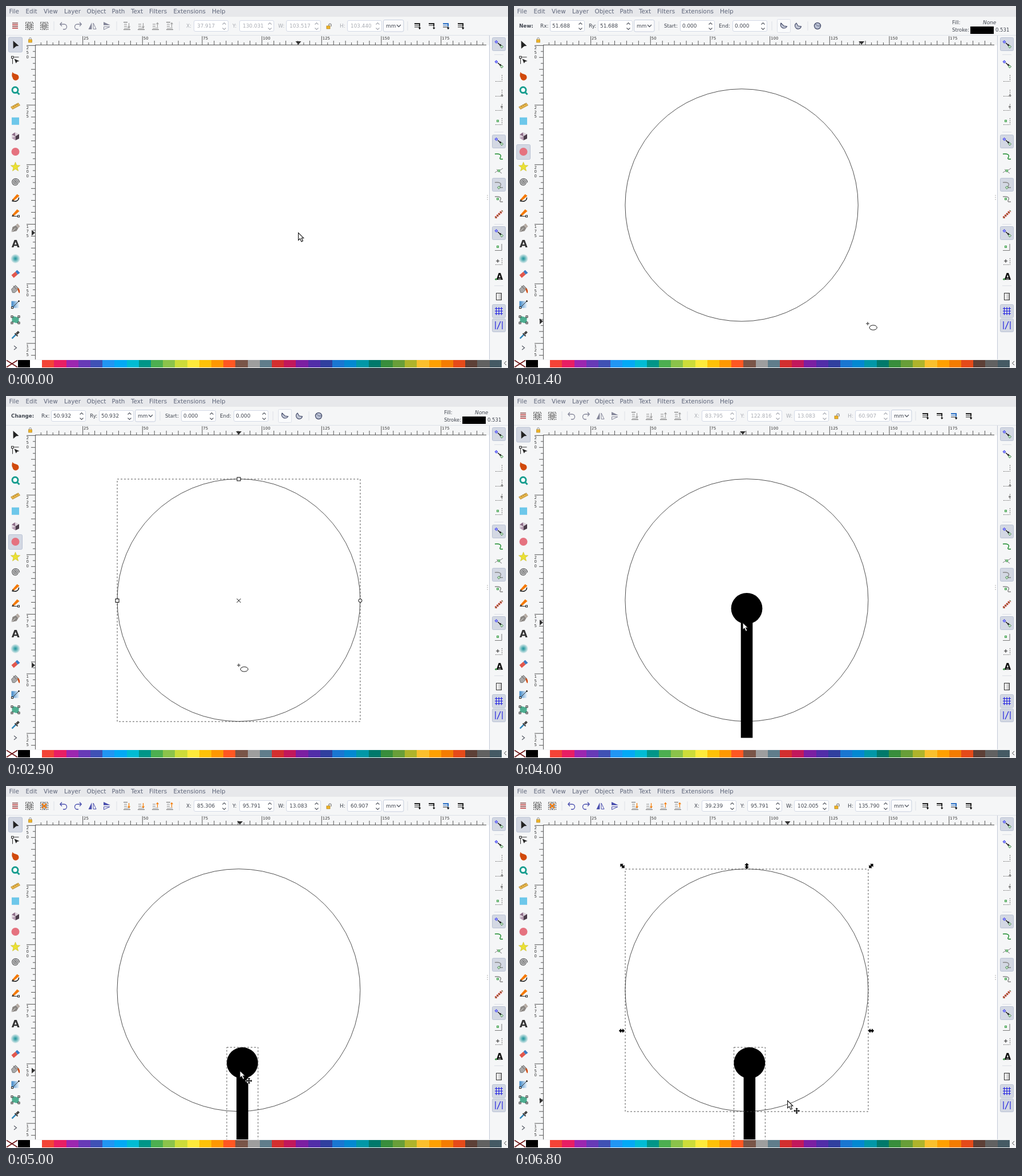
Write an HTML page that moves like this. It is 880x636 px and loops after 8000 ms.

```html
<!DOCTYPE html>
<html lang="en">
<head>
<meta charset="utf-8">
<title>Drawing a circle and a pin</title>
<style>
html, body { margin: 0; width: 100%; height: 100%; overflow: hidden; background: #f5f6f7; }
svg { display: block; width: 880px; height: 636px; }
text { font: 8.9px "DejaVu Sans", sans-serif; fill: #3f444e; white-space: pre; }
.menu text { font-size: 10.4px; fill: #5f667a; }
.ruler text { font-size: 7px; fill: #333; }
.dim { --ink: #85879a; --hot: #a0a0a0; --num: #a9acb3; --spin: #a5a8b0; }
.live { --ink: #4a4fae; --hot: #f57900; --num: #3f444e; --spin: #50545e; }
.num { fill: var(--num); }
.ink { stroke: var(--ink); fill: none; }
.solid { fill: var(--ink); }
.spin { fill: none; stroke: var(--spin); stroke-width: 1.1; }
.dash { fill: none; stroke: #444; stroke-width: .9; stroke-dasharray: 3 3; }
</style>
</head>
<body>
<svg id="stage" viewBox="0 0 880 636" xmlns="http://www.w3.org/2000/svg"></svg>
<script>
const LOOP = 8000, STEP = 100, PX = 4.187;
const LEFT = 194.9, TOP = 145.7;
const $ = id => document.getElementById(id);
const at = (x, y, body, extra = '') => `<g transform="translate(${x} ${y})${extra}">${body}</g>`;
const rect = (x, y, w, h, fill, more = '') => `<rect x="${x}" y="${y}" width="${w}" height="${h}" fill="${fill}" ${more}/>`;
const line = (d, color = '#333', w = 1, more = '') => `<path d="${d}" fill="none" stroke="${color}" stroke-width="${w}" ${more}/>`;
const shape = (d, fill, more = '') => `<path d="${d}" fill="${fill}" ${more}/>`;
const dot = (x, y, r, fill, more = '') => `<circle cx="${x}" cy="${y}" r="${r}" fill="${fill}" ${more}/>`;
const text = (x, y, s, more = '') => `<text x="${x}" y="${y}" ${more}>${s}</text>`;
const pressed = (x, y, w, h) => rect(x, y, w, h, '#d3d8e3', 'rx="2" stroke="#b9c2d4"');
const vsep = x => line(`M${x} 27V43`, '#dde0e6');

function field(x, id, pad = 6, value = '') {
  return rect(x + .5, 25.5, 60, 19, '#fff', 'rx="2.5" stroke="#d3d9e6"') +
    text(x + pad, 38.3, value, `id="${id}" class="num"`) +
    `<path class="spin" d="M${x + 50.5} 32.5l3 -3 3 3M${x + 50.5} 38.5l3 3 3 -3"/>`;
}
const unit = x => rect(x + .5, 24.5, 35.5, 20.5, '#fbfbfc', 'rx="2.5" stroke="#c6cede"') +
  text(x + 5, 38.3, 'mm') + line(`M${x + 24} 33l3.5 3.5 3.5 -3.5`, '#555a64', 1.3);

function menu() {
  const items = { File: 5.5, Edit: 34.5, View: 66, Layer: 102, Object: 141.5, Path: 185.5, Text: 219, Filters: 251, Extensions: 293.5, Help: 361 };
  return rect(0, 0, 880, 19, '#e7e8eb') + '<g class="menu">' +
    Object.entries(items).map(([s, x]) => text(x, 13.3, s)).join('') + '</g>';
}

function selectBar() {
  const stack = hot => rect(-6.5, -6.5, 13, 13, 'none', 'stroke="#333" stroke-dasharray="2 1.5"') +
    [3, 0, -3].map(y => shape(`M-5 ${y}l5 -2.2 5 2.2 -5 2.2z`, '#e8e8e8', 'stroke="#333" stroke-width=".8"')).join('') +
    (hot ? '<path style="stroke:var(--hot)" stroke-width="2" d="M-4 -4L4 4M-4 4L4 -4"/>' : '');
  const undo = '<path class="ink" stroke-width="1.3" d="M-6 -3H1a4.5 4.5 0 0 1 0 9H-1M-3 -6.5L-6.2 -3L-3 .5"/>';
  const flip = '<path class="solid" d="M-1.2 -6V6H-7z"/><path class="ink" d="M1.5 -5V5.5H6.5z"/>';
  const order = (up, end) => [-5, -1.5, 2].map(y => line(`M-5 ${y + 2}H${y > 0 ? 5 : 0}`, '#8a8a8a')).join('') +
    line(`M-6 6.5H6${end ? 'M-6 -6.5H1' : ''}`, '#666') +
    `<path fill="none" style="stroke:var(--hot)" stroke-width="1.2" d="M3.5 -5V2.5${up ? 'M1.5 -3L3.5 -5.5L5.5 -3' : 'M1.5 .5L3.5 3L5.5 .5'}"/>`;
  const affect = i => [-4, -1, 2].slice(0, i === 1 ? 2 : 3).map(y => line(`M-5 ${y}H4V${y + 4}`, i === 2 && y < 0 ? '#2a6fc4' : '#222', y < -3 ? 2 : 1.2)).join('') +
    shape('M2 3H6.5L4 6z', '#111');
  return at(16, 35, [-5, -2, 1, 4].map((y, i) => line(`M-5 ${y}H5`, i % 2 ? '#b33' : '#8a4a4a', 1.5)).join('')) +
    at(41, 35, stack(false)) + at(67, 35, stack(true)) + vsep(84) +
    at(101, 35, undo) + at(126, 35, undo, ' scale(-1 1)') + at(151.5, 35, flip) + at(177, 35, flip, ' rotate(90)') + vsep(194) +
    [212, 237, 262, 287].map((x, i) => at(x, 35, order(i > 1, i % 3 === 0))).join('') + vsep(304) +
    [['X:', 316, 329], ['Y:', 397, 409], ['W:', 477, 491], ['H:', 585, 598]].map(([s, x, f], i) => text(x, 38.3, s, 'class="num"') + field(f, 'val' + i)).join('') +
    at(566, 36, rect(-4, -1, 6, 5, '#f0b429', 'stroke="#a8780a" stroke-width=".7"') + line('M0 -1V-3a2 2 0 0 1 4 0V0', '#777', 1.2)) +
    unit(661) + vsep(704) + [721, 746, 771, 797].map((x, i) => at(x, 35, affect(i))).join('');
}

function ellipseBar() {
  const pie = (d, x) => at(x, 35, shape(d, '#c3c8d6', 'stroke="#434a68" stroke-width="1.1"'));
  return text(9, 38.3, '', 'id="mode" style="font-weight:bold;font-size:8.7px"') + '<g id="ellipseFields" class="live">' +
    text(46, 38.3, 'Rx:') + field(63, 'rx', 4) + text(131, 38.3, 'Ry:') + field(147, 'ry', 4) + unit(210) + vsep(254) +
    text(263, 38.3, 'Start:', 'style="font-size:8.6px"') + field(291, 'start', 4, '0.000') + text(359, 38.3, 'End:') + field(383, 'end', 4, '0.000') + vsep(452) +
    rect(461.5, 23.5, 23, 23, '#fafbfc', 'stroke="#dce0e8" rx="2"') +
    pie('M-5 -5L0 0L5.5 1A5.6 5.6 0 1 1 -5 -5z', 473) + pie('M-3 -5L0 0L5.5 1A5.6 5.6 0 1 1 -3 -5z', 498) + vsep(515) +
    at(532, 35, dot(0, 0, 5.6, '#b8bfd2', 'stroke="#434a68" stroke-width="1.2"') + line('M0 0H5.5M0 0L-4 -4', '#434a68', .8)) + '</g>' +
    text(768, 32, 'Fill:', 'style="font-size:8.6px"') + text(822, 32, 'None', 'style="font-style:italic"') +
    text(768, 45, 'Stroke:', 'style="font-size:8.5px"') + rect(800, 36, 41, 13, '#000') + text(844, 45, '0.531', 'style="font-size:8.5px"');
}

function rulers() {
  let d = 'M51 68.5H842M51.5 69V621', labels = '';
  for (let i = -8; i < 68; i++) {
    const p = i * 2.5 * PX, x = 134.6 + p, y = 69.4 + p;
    const n = i % 10 === 0 ? 15 : i % 2 ? 4 : 7;
    if (x > 52 && x < 842) d += `M${x} 68v${-n}`;
    if (y > 69 && y < 621) d += `M51 ${y}h${-n}`;
    if (n < 15) continue;
    if (x < 842) labels += text(x + 1.4, 59, 25 + i * 2.5);
    if (y < 621) [...String(250 - i * 2.5)].forEach((c, k) => labels += text(35.5, y + 7 + k * 7.6, c));
  }
  return line(d, '#444', .9) + `<g class="ruler">${labels}</g>` +
    at(42.5, 60, rect(-3, -1, 6, 5, '#f0b429', 'stroke="#a8780a" stroke-width=".6"') + line('M-1.8 -1V-2.5a1.8 1.8 0 0 1 3.6 0V-1', '#888', 1));
}

function toolbox() {
  const arrow = shape('M-4 -7L6 2L1.5 2.5L-3.8 7z', '#222');
  const corners = (w, h) => [[-w, -h], [w, -h], [w, h], [-w, h]].map(([x, y]) => rect(x - 1.5, y - 1.5, 3, 3, '#fff', 'stroke="#222"')).join('');
  const pencil = shape('M-5 3L3 -6L7 -3L-2 5L-6 6z', '#f57900') + shape('M-5 3L-2 5L-6 6z', '#333');
  const spiral = () => {
    let d = 'M0 0';
    for (let a = 0; a < 19; a += .3) d += `L${(a * .37 * Math.cos(a)).toFixed(1)} ${(a * .37 * Math.sin(a)).toFixed(1)}`;
    return line(d, '#444', 1.1);
  };
  const star = Array.from({ length: 10 }, (_, i) => {
    const r = i % 2 ? 3.6 : 8.5, a = i * Math.PI / 5;
    return `${(r * Math.sin(a)).toFixed(1)},${(-r * Math.cos(a)).toFixed(1)}`;
  }).join(' ');
  const art = [
    arrow,
    line('M-5 -5H6M-5 -5V7', '#333') + rect(-7, -6.5, 3.5, 3.5, '#fff', 'stroke="#222"') + shape('M-2 -2L7 2L3 3L1 6z', '#222'),
    shape('M-5 -6C-4 -1 5 -4 6 3A5.5 5.5 0 0 1 -5 4C-7 1 -6 -3 -5 -6z', '#d1490b'),
    dot(-.5, -1, 5, '#fff', 'stroke="#179d8f" stroke-width="3"') + line('M3 3L7 7', '#179d8f', 3),
    shape('M-8 2L5 -5L8 -1L-5 6z', '#e8b64c', 'stroke="#a77c20" stroke-width=".7"') + line('M-4 0l1.5 2M-1 -2l1.5 2M2 -3.5l1.5 2', '#7a5a14', .8),
    rect(-6.5, -6.5, 13, 13, '#6dc7ea'),
    shape('M0 -7L6.5 -4V4L0 7L-6.5 3V-3z', '#ddd3dc') + shape('M0 0L6.5 -4V4L0 7z', '#4b3c4a') + shape('M-6.5 -3L0 0L-1 -7z', '#8d6c87') + shape('M-6.5 3L0 0V7z', '#b79db3'),
    dot(0, 0, 7, '#e5727f'),
    `<polygon points="${star}" fill="#eae033" stroke="#cbbf20" stroke-width=".7"/>`,
    spiral(),
    pencil + line('M-6 6C0 8 6 6 6 0', '#222', 1.5),
    pencil + line('M-6 6H4', '#222') + rect(4, 4.5, 3, 3, '#fff', 'stroke="#222"'),
    shape('M-7 7L-5 -2L1 -5L5 0L2 5z', '#8b8783') + shape('M1 -6L4 -8L8 -3L5 0z', '#b5aaa2') + line('M-7 7L0 0', '#fff', .8),
    text(-6.7, 6.5, 'A', 'style="font-size:18px;font-weight:bold;fill:#333"'),
    dot(0, 0, 8, 'url(#glow)'),
    shape('M-7 2L0 -4L4 1L-3 7z', '#e2574c') + shape('M0 -4L3 -7L8 -2L4 1z', '#3b7dc4'),
    shape('M-7 0L0 -7L6 -1L-1 6H-5z', '#a9a9a9', 'stroke="#777"') + line('M-4 -6L2 0', '#666') + shape('M3 -2C8 -1 8 3 7.5 7C5 7 5 2 3 -2z', '#cf4a12'),
    rect(-7, -6, 13, 12, 'url(#sky)') + line('M-5 5L6 -6', '#333') + rect(-7, 4, 3, 3, '#fff', 'stroke="#222"') + dot(6, -6, 1.5, '#333'),
    shape('M-6 -5C-2 -8 2 -3 6 -5V5C2 8 -2 3 -6 5z', '#4fae91') + corners(6, 5.5),
    line('M-6 6L1 -1', '#2b82b5', 2.5) + line('M-1 -3L4 2', '#333', 2) + line('M2 -2L6 -6', '#444', 4)
  ];
  return art.map((a, i) => at(16.5, 68 + i * 26.85, a)).join('') + line('M14 597l4.5 3.5 -4.5 3.5', '#555a64', 1.2);
}

function snapBar() {
  const green = '#3f9b4b', blue = '#2020e0';
  const node = (x, y, c = '#c5ecc8', s = '#23602a') => shape(`M${x - 2.6} ${y}l2.6 -2.6 2.6 2.6 -2.6 2.6z`, c, `stroke="${s}" stroke-width=".8"`);
  const snap = node(-4.5, -4, '#8c90ff', blue) + line('M-2 -2L3 2', '#111', 1.4) + shape('M4 3L.5 2.6L3.4 -.4z', '#111') + node(5, 4.5);
  const corner = line('M5.5 -6V5.5H-7', '#777', 1, 'stroke-dasharray="2 1.5"');
  const sq = (x, y) => rect(x - 1.5, y - 1.5, 3, 3, '#b5e6ba', `stroke="${green}"`);
  const curve = c => line('M-7 -4C0 -5 5 -3 3 1C2 3 1 4 3 5H7', c, 1.4);
  const grid = line('M-4.5 -7V7M0 -7V7M4.5 -7V7M-7 -4.5H7M-7 0H7M-7 4.5H7', blue, 1.1);
  const art = [
    [67, snap], [102, snap], [127, corner], [153, corner + dot(5.5, 4.5, 2, '#888')], [178, corner + dot(5, -1, 2, '#888')], [203, corner + sq(-2, -1)],
    [238, snap], [264, curve('#198a2b')], [289, line('M-7 4C-2 -1 2 1 7 -4M-4 -2L5 5', '#777') + sq(0, .5)], [314, curve('#888') + node(0, 5)],
    [339, curve('#888') + sq(-2, 0)], [366, line('M-6 6L6 -6', '#d22', 4, 'stroke-dasharray="2.5 1.5"') + line('M-7 7L7 -7', green, 1)],
    [399, snap], [424, line('M5 -6V5.5H-7', '#777') + sq(-2, -1)], [449, corner + line('M-5 -1H1M-2 -4V2', '#222')],
    [475, text(-4.5, 5.5, 'A', 'style="font-size:15px;font-weight:bold;fill:#111"') + line('M-7 5.5H6', '#111') + dot(-5, 5, 1.8, green)],
    [510.5, rect(-4.5, -6, 9, 12, 'url(#page)', 'stroke="#333"')], [536, grid], [561, line('M-6 -7V7M6 -7V7M-3 7L3 -7', blue, 1.2)]
  ];
  return [55, 226, 302, 387, 524, 549].map(y => pressed(852.5, y + .5, 23, 23)).join('') +
    [85, 221, 383, 491].map(y => line(`M856 ${y}.5H872`, '#dcdfe6')).join('') +
    art.map(([y, a]) => at(864, y, a)).join('');
}

function palette() {
  const hues = ('000 fff f44336 e91e63 9c27b0 673ab7 3f51b5 2196f3 03a9f4 00bcd4 009688 4caf50 8bc34a cddc39 ffeb3b ffc107 ff9800 ff5722 795548 9e9e9e 607d8b ' +
    'd32f2f c2185b 7b1fa2 512da8 303f9f 1976d2 0288d1 0097a7 00796b 388e3c 689f38 afb42b fbc02d ffa000 f57c00 e64a19 5d4037 616161 455a64').split(' ');
  const edge = i => Math.floor(i * 21.2);
  return rect(0, 621, 880, 15, '#f5f6f7') + rect(0, 622, 21, 13, '#fff') + line('M1 622.5L20 634.5M1 634.5L20 622.5', '#6b1010', 1.5) +
    hues.map((c, i) => rect(edge(i + 1), 622, edge(i + 2) - edge(i + 1), 13, '#' + c)).join('') + line('M877 624l-3.5 3.5 3.5 3.5', '#444');
}

function artwork() {
  const grip = (x, y, turn) => at(x, y, shape('M-5.2 0l4 -4v2.5h2.4v-2.5l4 4 -4 4v-2.5h-2.4v2.5z', '#000'), ` rotate(${turn})`);
  const knob = (x, y) => rect(x - 3, y - 3, 6, 6, '#fff', 'stroke="#000"');
  return rect(52, 69, 795, 552, '#fff') + '<g clip-path="url(#view)">' +
    '<circle id="ring" fill="none" stroke="#000" stroke-width=".7"/>' +
    '<g id="pin"><circle cx="408" cy="373.3" r="27.4"/>' + rect(397.7, 373, 20.6, 227.6, '#000') +
    '<rect id="pinBox" class="dash" x="380.7" y="346" width="54.8" height="255"/></g>' +
    '<rect id="ringBox" class="dash" x="195" y="146" width="426" height="426"/>' +
    '<g id="knobs">' + knob(408, 146) + knob(195, 359.5) + dot(621, 359.5, 3, '#fff', 'stroke="#000"') + line('M404.5 356l7 7M404.5 363l7 -7', '#000') + '</g>' +
    '<g id="grips">' + grip(190, 140.5, 45) + grip(408, 140.5, 90) + grip(626, 140.5, -45) + grip(189, 430, 0) + grip(626, 430, 0) + '</g></g>';
}

function pointers() {
  const cross = 'M0 -5.5l2.3 2.5h-1.5v2.2h2.2v-1.5l2.5 2.3 -2.5 2.3v-1.5h-2.2v2.2h1.5l-2.3 2.5 -2.3 -2.5h1.5v-2.2h-2.2v1.5l-2.5 -2.3 2.5 -2.3v1.5h2.2v-2.2h-1.5z';
  return '<g id="arrow">' + shape('M0 0V13L3 10.2L5.4 15.4L7.9 14.2L5.6 9.2H9.2z', '#fff', 'stroke="#111" stroke-width="1.1"') +
    `<g id="mover" transform="translate(16 18)">${shape(cross, '#000', 'stroke="#fff" stroke-width="1.6" paint-order="stroke"')}</g></g>` +
    '<g id="pen">' + line('M-3 0H3M0 -3V3', '#222') + '<ellipse cx="9.7" cy="7" rx="6.6" ry="4.2" fill="#fff" stroke="#111"/></g>';
}

$('stage').innerHTML =
  '<defs><clipPath id="view"><rect x="52" y="69" width="795" height="552"/></clipPath>' +
  '<radialGradient id="glow"><stop offset=".1" stop-color="#2a9aa0"/><stop offset="1" stop-color="#2a9aa0" stop-opacity=".1"/></radialGradient>' +
  '<linearGradient id="sky"><stop stop-color="#3d86c6"/><stop offset="1" stop-color="#e5f0fa"/></linearGradient>' +
  '<linearGradient id="page"><stop stop-color="#fff"/><stop offset="1" stop-color="#bbb"/></linearGradient></defs>' +
  rect(0, 0, 880, 636, '#f5f6f7') + menu() + line('M0 51.5H880', '#dde1e8') +
  `<g id="selectBar">${selectBar()}</g><g id="ellipseBar">${ellipseBar()}</g>` +
  artwork() + rulers() + shape('M-5 -6H5L0 0z', '#333', 'id="markX"') + shape('M-6 -5V5L0 0z', '#333', 'id="markY"') +
  `<g id="tool">${pressed(4.5, -13, 24, 26)}</g>` + toolbox() +
  line('M847.5 52V621', '#c3c9d6') + line('M844 332V342', '#bbb', 1.5, 'stroke-dasharray="1.5 2"') + snapBar() + palette() + pointers();

// Pointer path: time, x, y
const path = [
  [300, 512.5, 398.5], [500, 420, 447], [600, 250, 380], [700, 60, 282], [800, 17, 256], [900, 17, 256],
  [1000, 90, 215], [1100, 170, 160], [1190, LEFT, TOP], [1200, LEFT, TOP], [1300, 560, 536], [1400, 620, 558],
  [1500, 640, 562], [1600, 646, 563.5], [1900, 646, 563.5], [1980, 660.5, 571], [2200, 661, 571.4],
  [2500, 560, 530], [2850, 408, 473], [3400, 408, 473], [3600, 120, 170], [3700, 17, 68], [3800, 90, 140],
  [3970, 401, 398], [4000, 401, 398], [4200, 403.7, 386.9], [4300, 403.7, 386.9], [4600, 406, 440], [4900, 410, 500],
  [5800, 410, 500], [6000, 432, 535], [6300, 476, 572], [6560, 479.6, 552.8], [LOOP, 479.6, 552.8]
];

function pointerAt(t) {
  if (t <= path[0][0]) return path[0].slice(1);
  const i = path.findIndex(p => p[0] >= t), [a, ax, ay] = path[i - 1], [b, bx, by] = path[i];
  const k = (t - a) / (b - a);
  return [ax + (bx - ax) * k, ay + (by - ay) * k];
}

const show = (id, on) => $(id).style.display = on ? '' : 'none';
const move = (id, x, y) => $(id).setAttribute('transform', `translate(${x.toFixed(2)} ${y.toFixed(2)})`);
const label = (id, s) => $(id).textContent = s;

function draw(time) {
  const t = Math.floor(time / STEP) * STEP;
  const within = (a, b = LOOP) => t >= a && t < b;
  const [x, y] = pointerAt(t), [mx, my] = pointerAt(t - 18);
  const drawing = within(900, 3700), changing = within(2300, 3300), both = within(6800);

  show('selectBar', !drawing);
  show('ellipseBar', drawing);
  move('tool', 0, drawing ? 256.5 : 68);
  label('mode', changing ? 'Change:' : 'New:');
  move('ellipseFields', changing ? 16 : 0, 0);
  for (const id of ['rx', 'ry']) label(id, t < 2300 ? '51.688' : '50.932');

  const size = t < 2100 ? Math.max(0, Math.min(mx - LEFT, my - TOP)) : 426;
  const ring = $('ring');
  ring.setAttribute('cx', LEFT + size / 2);
  ring.setAttribute('cy', TOP + size / 2);
  ring.setAttribute('r', size / 2);
  show('ring', within(1300));
  show('ringBox', changing || both);
  show('knobs', changing);
  show('grips', both);

  // The pin follows the drag, then two small nudges to the left
  let dx = 0, dy = 0;
  if (t >= 4300) {
    const [px, py] = pointerAt(Math.min(t, 5000));
    dx = (px - 403.7) / 6.3 * 6.327 - .75 * ((t >= 5300) + (t >= 5500));
    dy = (py - 386.9) / 113.1 * 113.154;
  }
  move('pin', dx, dy);
  show('pin', within(3300));
  show('pinBox', within(4300));

  const vals = t < 3300 ? [37.917, 130.031, 103.517, 103.44] :
    both ? [39.239, 95.791, 102.005, 135.79] :
    [83.795 + dx / PX, 122.816 - dy / PX, 13.083, 60.907];
  vals.forEach((v, i) => label('val' + i, v.toFixed(3)));
  $('selectBar').setAttribute('class', within(4400) ? 'live' : 'dim');

  const pen = drawing && x > 52 && y > 69;
  show('pen', pen);
  show('arrow', !pen);
  show('mover', within(4300, 5900) || within(6600));
  move('pen', x, y);
  move('arrow', x, y);
  move('markX', Math.max(52, mx), 68);
  move('markY', 51, Math.max(69, my));
}

const begin = performance.now();
function tick() {
  draw((performance.now() - begin) % LOOP);
  requestAnimationFrame(tick);
}
tick();
</script>
</body>
</html>
```
